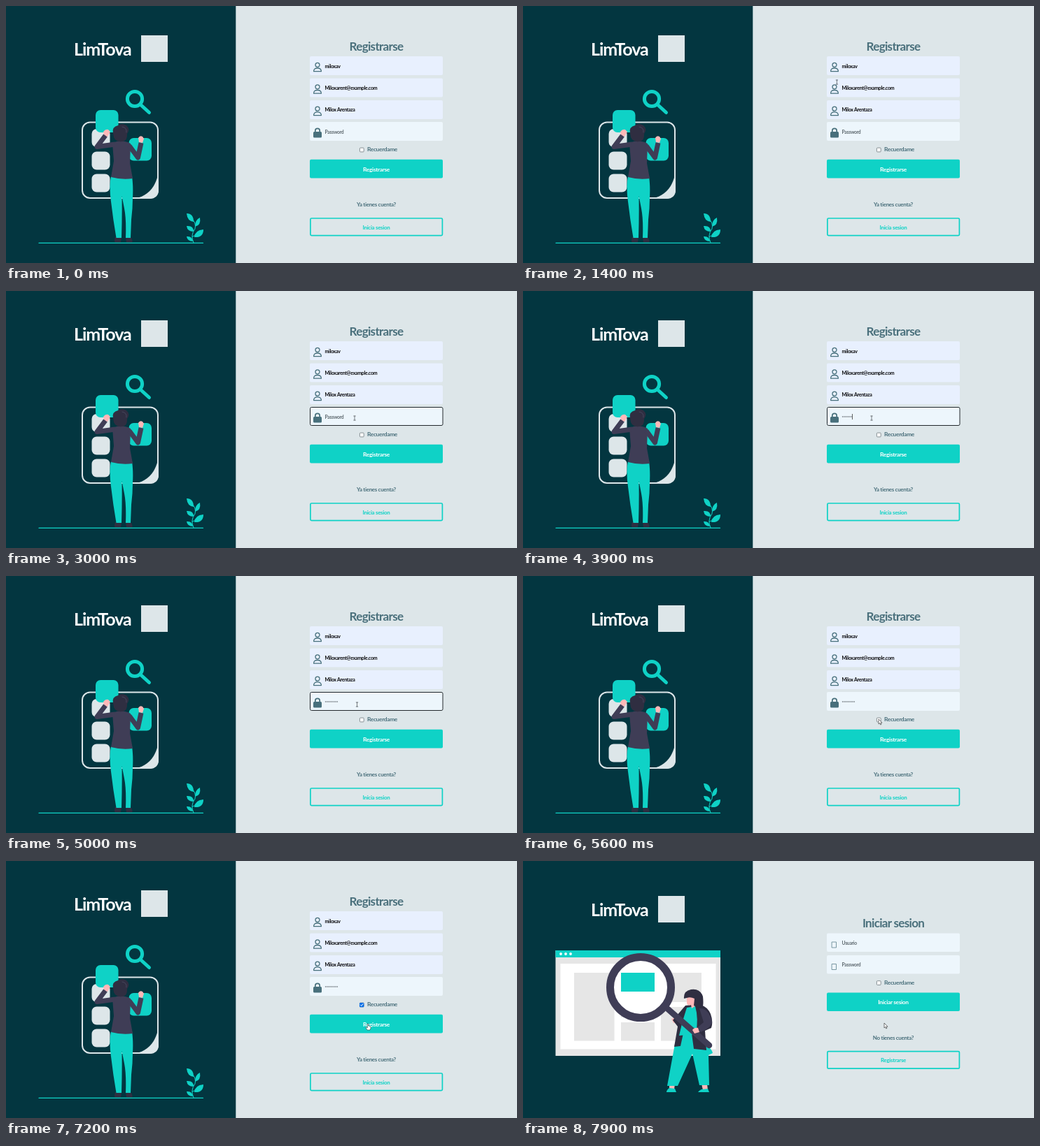
An HTML page for the animation above (8 s loop, 730x368 px).

```html
<!DOCTYPE html>
<html lang="es">
<head>
<meta charset="utf-8">
<title>Registrarse</title>
<style>
html, body { margin: 0; width: 100%; height: 100%; overflow: hidden; background: #dde6e9; }
svg { display: block; width: 730px; height: 368px; }
text { font-family: Lato, Roboto, sans-serif; font-weight: 700; letter-spacing: -.04em; }
.title { font-size: 17px; fill: #4a707c; text-anchor: middle; }
.name { font-size: 25px; fill: #fff; }
.input { font-size: 7px; fill: #0a0a0c; }
.hint { font-size: 6.8px; fill: #5d686e; }
.label { font-size: 8.4px; fill: #4a707c; }
.btn { font-size: 8.4px; fill: #fff; }
.btn, .ask { text-anchor: middle; }
.ask { font-size: 8px; fill: #4a707c; }
.alt { font-size: 8px; fill: #0fd2c6; }
.teal { fill: #0fd2c6; }
.light { fill: #dde6e9; }
.ink { fill: #2f2e41; }
.coat { fill: #3f3d56; }
.skin { fill: #ffb8b8; }
.grey { fill: #e6e6e6; }
.line { fill: none; stroke-linecap: round; stroke-linejoin: round; }
.frame { fill: none; stroke: #0fd2c6; stroke-width: 1.7; }
</style>
</head>
<body>
<svg viewBox="0 0 730 368">
  <defs>
    <g id="user" class="line" stroke="#48707c" stroke-width="1.3">
      <circle cy="-3.2" r="3"/>
      <path d="M-5.4 6.2C-5.4 2.6-3.4 1.5 0 1.5S5.4 2.6 5.4 6.2Z"/>
    </g>
    <g id="box">
      <rect x="-2.9" y="-2.9" width="5.8" height="5.8" rx="1" fill="#fff" stroke="#6c767b" stroke-width=".8"/>
    </g>
    <g id="brand">
      <text class="name" x="97" y="29">LimTova</text>
      <rect class="light" x="193" width="38" height="38"/>
    </g>
  </defs>
  <rect width="730" height="368" fill="#dde6e9"/>
  <rect width="328.300" height="368" fill="#033640"/>

  <g id="signup">
    <use href="#brand" y="42"/>
    <g class="line" stroke="#0fd2c6" stroke-width="5">
      <circle cx="184" cy="133" r="10.6"/>
      <path d="M192.5 141.5L204.5 152.5"/>
    </g>
    <rect x="109" y="166.5" width="108" height="108.5" rx="11" fill="none" stroke="#dde6e9" stroke-width="2"/>
    <path class="light" d="M217.5 237C216 256 204 272 185 275.5H206Q218 275 218 263Z"/>
    <g class="light">
      <rect x="122.5" y="176" width="26" height="26" rx="7"/>
      <rect x="122.5" y="208.5" width="26" height="26" rx="7"/>
      <rect x="122.5" y="240.5" width="26" height="26" rx="7"/>
    </g>
    <rect class="teal" x="128" y="149" width="32.5" height="32" rx="7"/>
    <rect class="teal" x="175.5" y="189" width="32.5" height="32.5" rx="7"/>
    <path class="skin" d="M140 185L139 180Q142 176 146 177L149 180L145 187ZM190 195L189 189Q191 185 195 187L197 190L195 196Z"/>
    <path class="ink" d="M156 331Q154 337 156 338.5H164L165 331ZM171 331L172 338.5H180Q182 336 178 331Z"/>
    <path class="teal" d="M150 244H180Q182 258 181 275Q181 290 179 306L178 332H171Q172 305 169 290L165.500 272Q166 300 165 332H157.500Q153 306 150 280Q147 258 150 244Z"/>
    <path class="coat" d="M152 196Q165 190 178 197L177 225L181 247Q165 249 150 245L154 222Z"/>
    <path class="line" d="M156 198L130 201.500L142 185.500M176 200L188.500 217L193 196" stroke="#3f3d56" stroke-width="7" style="stroke-linecap: butt"/>
    <path class="ink" d="M153 182Q151 173 160 171Q166 167 172 171Q178 176 173 183Q174 193 166 194Q157 195 154 188Z"/>
    <path class="line" d="M166 173Q173 174 172 181" stroke="#4a4860" stroke-width=".9"/>
    <path class="line" d="M47 339.3H281.5" stroke="#0fd2c6" stroke-width="1.3"/>
    <g class="teal">
      <path class="line" d="M268 339Q263 328 270 319Q272 311 266 305M266 330Q272 329 275 324" stroke="#0fd2c6" stroke-width="1"/>
      <path d="M268 309Q259 308 258 297Q268 297 268 309Z"/>
      <path d="M270 316Q270 306 277 303Q279 314 270 316Z"/>
      <path d="M268 323Q259 323 258 315Q268 314 268 323Z"/>
      <path d="M269 331Q270 321 282 320Q282 332 269 331Z"/>
      <path d="M267 337Q259 337 258 330Q266 329 267 337Z"/>
    </g>

    <text class="title" x="529" y="64.3">Registrarse</text>
    <g fill="#e8f0fe">
      <rect x="434" y="72" width="190" height="27" rx="2"/>
      <rect x="434" y="103.5" width="190" height="27" rx="2"/>
      <rect x="434" y="135" width="190" height="27" rx="2"/>
    </g>
    <rect x="434" y="166" width="190" height="27" rx="2" fill="#edf6fc"/>
    <use href="#user" x="445" y="87.5"/>
    <use href="#user" x="445" y="119"/>
    <use href="#user" x="445" y="150.4"/>
    <rect x="439" y="180" width="12" height="8.5" rx="1.5" fill="#48707c"/>
    <path class="line" d="M441.8 181V178.5A3.2 3.2 0 0 1 448.2 178.500V181" stroke="#48707c" stroke-width="1.7"/>
    <text class="input" x="455.5" y="88.5">miloxav</text>
    <text class="input" x="455.5" y="120">Miloxarent@example.com</text>
    <text class="input" x="455.5" y="151.3">Milox Arentaza</text>
    <text class="hint" id="hint" x="455.5" y="182.5">Password</text>
    <path class="line" id="dots" stroke="#40474c" stroke-width="1.3" stroke-dasharray="0 2.1"/>
    <rect id="caret" y="176" width=".7" height="8" fill="#222"/>
    <rect id="ring" x="434.500" y="166.500" width="189.500" height="26" rx="2" fill="none" stroke="#22282c"/>
    <use href="#box" x="508.3" y="206"/>
    <g id="tick">
      <rect id="tickbg" x="505" y="202.9" width="6.3" height="6.3" rx="1"/>
      <path class="line" d="M506.4 206.1L507.7 207.5L510 204.6" stroke="#fff"/>
    </g>
    <text class="label" x="516" y="208.2">Recuerdame</text>
    <rect class="teal" x="434" y="219.8" width="190" height="26.6" rx="2"/>
    <text class="btn" x="529" y="236.5">Registrarse</text>
    <text class="ask" x="529" y="287">Ya tienes cuenta?</text>
    <rect class="frame" x="434.900" y="304" width="188.500" height="24.600" rx="1.500"/>
    <text class="btn alt" x="529" y="319.5">Inicia sesion</text>
  </g>

  <g id="login">
    <use href="#brand" y="50"/>
    <rect class="grey" x="46.5" y="128" width="235.5" height="151"/>
    <rect class="teal" x="46.5" y="128" width="235.5" height="10"/>
    <g fill="#fff">
      <circle cx="54" cy="133" r="1.9"/><circle cx="61" cy="133" r="1.9"/><circle cx="68" cy="133" r="1.9"/>
      <rect x="53.5" y="147" width="222" height="122.5"/>
    </g>
    <g class="grey">
      <rect x="73" y="160" width="57.5" height="97.5"/>
      <rect x="140" y="195" width="48" height="29"/>
      <rect x="140" y="231" width="48" height="26.5"/>
      <rect x="197" y="160" width="58" height="42"/>
      <rect x="197" y="209" width="58" height="48.5"/>
    </g>
    <circle cx="168" cy="181" r="39" fill="#fff"/>
    <rect class="teal" x="140" y="160" width="48" height="27"/>
    <path class="ink" d="M141 150A41 41 0 1 0 194 213A37 37 0 0 1 141 150Z"/>
    <circle cx="168" cy="181" r="43.5" fill="none" stroke="#3f3d56" stroke-width="11"/>
    <path class="skin" d="M212 226L218 224L220 231L215 232ZM209 319H217L216 327H209ZM255 319H263L264 328H257Z"/>
    <path class="teal" d="M222 246H252L270 272L271 275L265 278L266 321H252L242 276L221 322H206L217 262Z"/>
    <path class="teal" d="M209 325L217 326L219 331H205Q205 328 209 325ZM255 327L264 326L266 331H250Q251 329 255 327Z"/>
    <path class="ink" d="M232 207L250 205Q263 207 268 219Q272 230 269 239L260 243L262 271L244 269L241 247L230 242L225 265L216 266L221 237L214 228L220 221Z"/>
    <path class="teal" d="M234 210L246 208Q251 225 247 248L223 250Q227 230 234 210Z"/>
    <path class="line" d="M207 212L266 264" stroke="#3f3d56" stroke-width="8.5"/>
    <path class="coat" d="M252 211Q266 211 270 231Q266 242 250 246L247 240L258 231Z"/>
    <path class="skin" d="M250 239Q245 238 242 242L245 247L252 245Z"/>
    <path class="skin" d="M234 193H246L247 207L241 211L240 206Q234 208 234 202Z"/>
    <path class="ink" d="M230 197Q229 186 240 184Q253 182 257 194Q258 203 257 208Q250 211 244 207L245 197Q239 194 234 196Z"/>

    <text class="title" x="529" y="95.3">Iniciar sesion</text>
    <g fill="#edf6fc">
      <rect x="434" y="103.5" width="190" height="26.5" rx="2"/>
      <rect x="434" y="135" width="190" height="26.5" rx="2"/>
    </g>
    <path class="line" d="M441.5 116H447.5V124H441.5ZM441.5 147.5H447.5V155.5H441.5Z" stroke="#6d8d97" stroke-width=".9"/>
    <text class="hint" x="455.5" y="119.8">Usuario</text>
    <text class="hint" x="455.5" y="151.2">Password</text>
    <use href="#box" x="508.3" y="174.6"/>
    <text class="label" x="516" y="176.8">Recuerdame</text>
    <rect class="teal" x="434" y="188.5" width="190" height="26.6" rx="2"/>
    <text class="btn" x="529" y="205.2">Iniciar sesion</text>
    <text class="ask" x="529" y="255.7">No tienes cuenta?</text>
    <rect class="frame" x="434.9" y="272.6" width="188.5" height="24.6" rx="1.5"/>
    <text class="btn alt" x="529" y="288.2">Registrarse</text>
  </g>

  <g id="cursor">
    <path id="arrow" d="M0 0V7L1.6 5.6L2.7 8L3.9 7.5L2.8 5.2H5Z" fill="#fff" stroke="#222" stroke-width=".6"/>
    <path id="beam" class="line" d="M-1.3-3H1.3M0-3V3M-1.3 3H1.3" stroke="#454c50" stroke-width=".7"/>
    <path id="hand" d="M-.7 0H.6V3L4 4V6.5L3 9H-1L-3 5.5L-2.3 4.7L-.7 6Z" fill="#fff" stroke="#222" stroke-width=".5"/>
  </g>
</svg>
<script>
const LOOP = 8000, STEP = 100, DOT = 2.1;
const $ = id => document.getElementById(id);
const show = (id, on) => { $(id).style.display = on ? '' : 'none'; };
const within = (t, a, b) => t >= a && t < b;

// time, x, y of the pointer
const track = [
  [1200, 400, 31], [1700, 521, 226], [2000, 500, 188], [2200, 498, 182],
  [4900, 498, 182], [5000, 501.5, 184], [5400, 508, 205],
  [6200, 508, 205], [6600, 517, 233], [7800, 517, 233], [7900, 516, 232]
];

function pointer(t) {
  const i = track.findIndex(k => k[0] > t);
  if (i < 0) return track[track.length - 1].slice(1);
  const a = track[Math.max(0, i - 1)], b = track[i];
  const u = Math.max(0, (t - a[0]) / (b[0] - a[0]));
  return [a[1] + (b[1] - a[1]) * u, a[2] + (b[2] - a[2]) * u];
}

function pointerKind(x, y, login) {
  if (login || x < 434) return 'arrow';
  if (within(y, 72, 193) && (y - 72) % 31.4 < 27) return 'beam';
  return within(y, 220, 246) ? 'hand' : 'arrow';
}

function draw(t) {
  const login = t >= 7900;
  show('signup', !login);
  show('login', login);

  const typed = Math.max(0, Math.min(9, Math.floor((t - 3200) / STEP)));
  show('hint', !typed);
  show('dots', typed);
  $('dots').setAttribute('d', `M456.5 180h${Math.max(0, typed - 1) * DOT + 0.05}`);
  show('caret', within(t, 2500, 3000) || within(t, 3100, 4700) || within(t, 5200, 5600));
  $('caret').setAttribute('x', 455.3 + typed * DOT);
  show('ring', within(t, 2500, 5600));

  show('tick', t >= 5700);
  $('tickbg').setAttribute('fill', t < 6400 ? '#0a55b5' : '#0b70e8');

  const [x, y] = pointer(t), kind = pointerKind(x, y, login);
  show('cursor', t >= 1200);
  $('cursor').setAttribute('transform', `translate(${x} ${y})`);
  for (const id of ['arrow', 'beam', 'hand']) show(id, id === kind);
}

function frame() {
  draw(Math.floor(performance.now() % LOOP / STEP) * STEP);
  requestAnimationFrame(frame);
}
frame();
</script>
</body>
</html>
```
